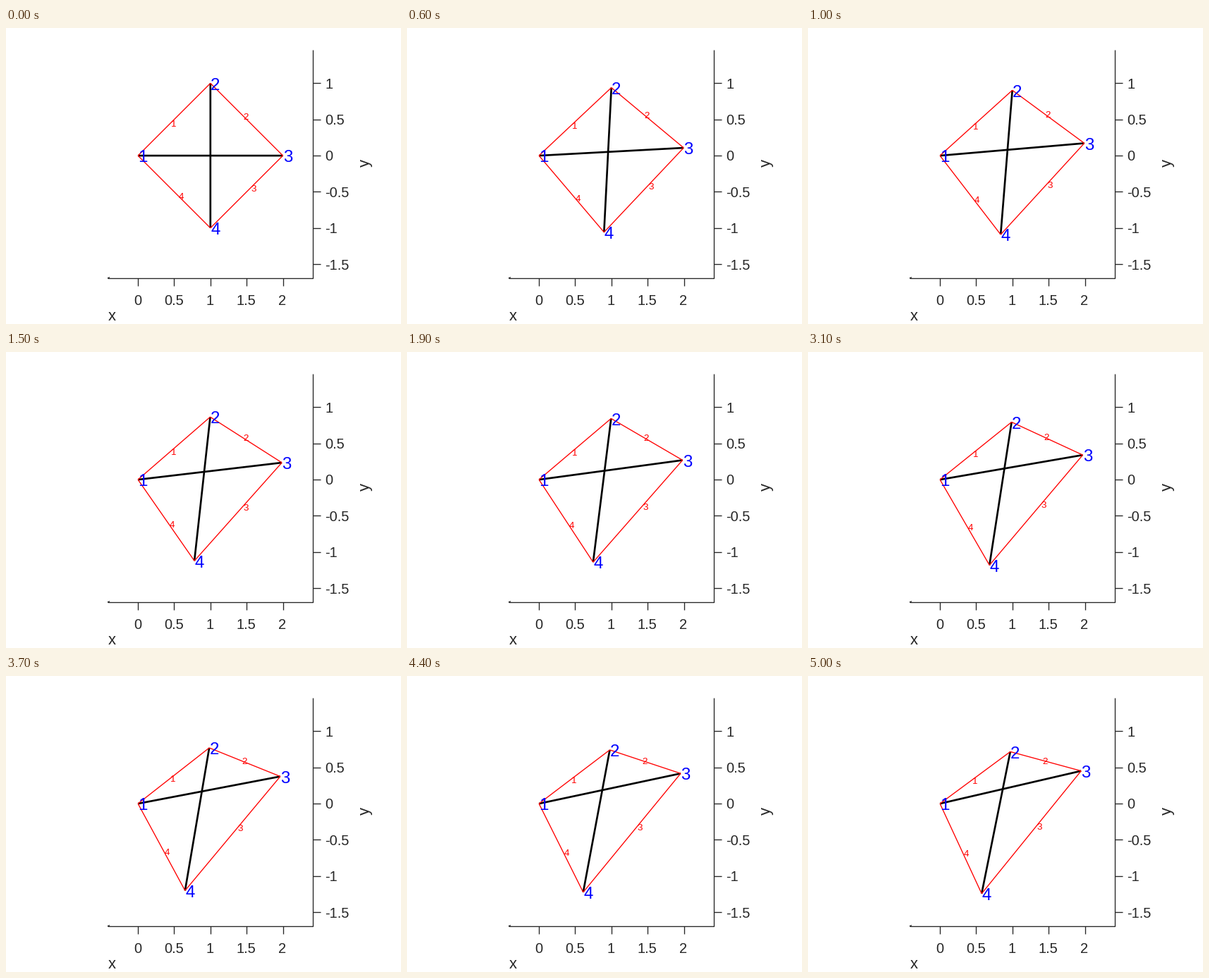
These frames come from a looping animation (560x420 px, 5.1 s). A matplotlib script:

```python
import math

import matplotlib.pyplot as plt
import numpy as np
from matplotlib.animation import FuncAnimation

W, H, DPI = 560, 420, 96
FRAMES, INTERVAL = 51, 100
X0, Y0, UNIT = 187.1, 181.1, 102.7  # pixel position of (0, 0), pixels per unit
RIGHT, BOTTOM = 435, 355
INK = "#262626"
BARS = [(0, 2), (1, 3)]
STRINGS = [(0, 1), (1, 2), (2, 3), (3, 0)]

plt.rcParams["font.family"] = "Liberation Sans"

fig = plt.figure(figsize=(W / DPI, H / DPI), dpi=DPI, facecolor="white")
ax = fig.add_axes([0, 0, 1, 1])
ax.set_xlim(0, W)
ax.set_ylim(H, 0)
ax.axis("off")


def line(xs, ys, color=INK, width=1.0, z=1, **kw):
    return ax.plot(xs, ys, color=color, lw=width, zorder=z,
                   solid_capstyle="butt", **kw)[0]


def label(x, y, s, size, color=INK, ha="left", **kw):
    return ax.text(x, y, s, fontsize=size, color=color, ha=ha,
                   va="baseline", zorder=5, **kw)


def draw_axes():
    line([144, RIGHT, RIGHT], [BOTTOM, BOTTOM, 31])
    line([144, 147], [BOTTOM, BOTTOM - 1.2])
    for v in np.arange(0, 2.1, 0.5):
        x = X0 + UNIT * v
        line([x, x], [BOTTOM, 366])
        label(x - 0.6, 393, f"{v:g}", 15, ha="center")
    for v in np.arange(-1.5, 1.1, 0.5):
        y = Y0 - UNIT * v
        line([RIGHT, 446], [y, y])
        label(452, y + 7.4, f"{v:g}", 15)
    label(150.5, 415.4, "x", 16.5, ha="center")
    label(514.5, 191.7, "y", 16.5, ha="center", rotation=90,
          rotation_mode="anchor")


def nodes(t):
    """Pixel positions of the four nodes at step t."""
    settle = math.sin(math.pi / 2 * min(t / 19.7, 1))
    swing = 0.003 * t + 0.078 * settle
    tilt = 0.0024 * t + 0.079 * settle
    length = 2 * UNIT
    left = np.array([X0, Y0])
    right = left + length * np.array([math.cos(swing), -math.sin(swing)])
    top = left + [UNIT - 0.0012 * t * t, -UNIT + 0.42 * t + 8 * settle]
    low = top + length * np.array([-math.sin(tilt), math.cos(tilt)])
    return [left, top, right, low]


draw_axes()
bar_lines = [line([], [], "black", 2, 2, snap=False) for _ in BARS]
string_lines = [line([], [], "red", 1, 3, snap=False) for _ in STRINGS]
string_labels = [label(0, 0, str(i + 1), 10, "red") for i in range(4)]
node_labels = [label(0, 0, str(i + 1), 18, "blue") for i in range(4)]


def update(t):
    p = nodes(t)
    for art, (a, b) in zip(bar_lines + string_lines, BARS + STRINGS):
        art.set_data(*zip(p[a], p[b]))
    for art, (a, b) in zip(string_labels, STRINGS):
        x, y = p[a] + 0.45 * (p[b] - p[a])
        art.set_position((x + 0.8, y + 5))
    for art, (x, y) in zip(node_labels, p):
        art.set_position((x + 0.4, y + 9.2))
    return bar_lines + string_lines + string_labels + node_labels


anim = FuncAnimation(fig, update, frames=FRAMES, interval=INTERVAL,
                     repeat=True, repeat_delay=0)
plt.show()
```
